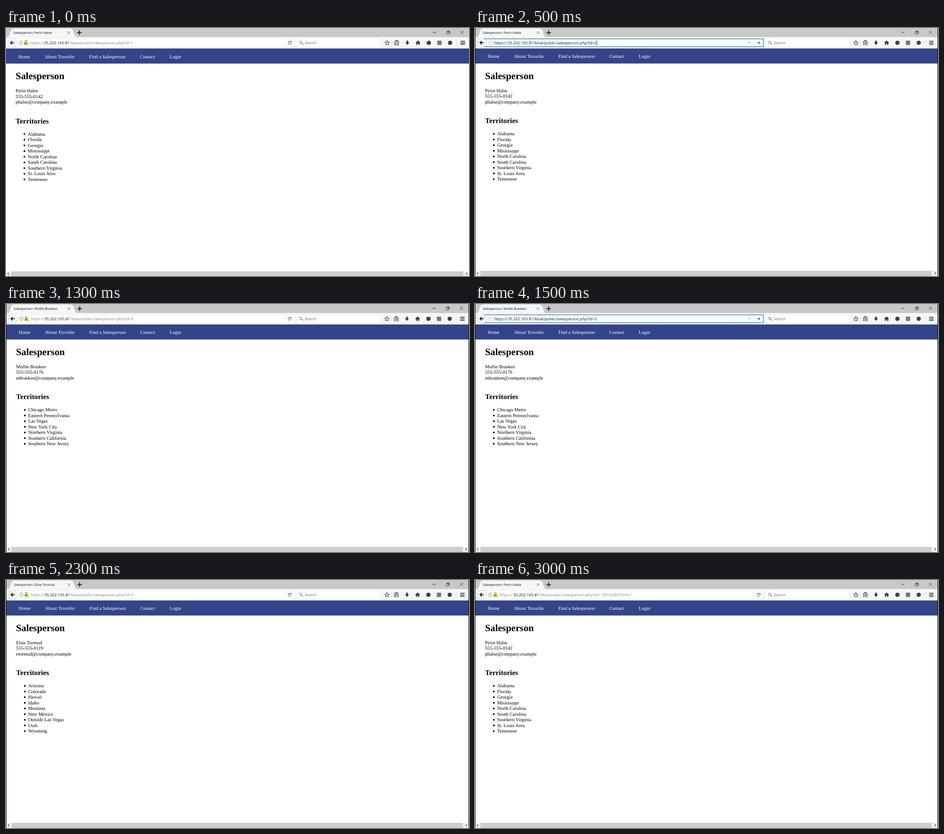
Recreate the animation shown at these times as an HTML page. Size 1023x548 px, loop 3.5 s.

```html
<!DOCTYPE html>
<html lang="en">
<head>
<meta charset="utf-8">
<title>Salesperson pages</title>
<style>
  html, body { margin: 0; width: 100%; height: 100%; overflow: hidden; background: #000; }
  svg { display: block; width: 1023px; height: 548px; text-rendering: geometricPrecision; }
  text { white-space: pre; }
  .ui { font-family: "Open Sans", "Noto Sans", sans-serif; }
  .page { font-family: "Liberation Serif", "Times New Roman", serif; font-size: 10.67px; }
  .line { fill: none; stroke: #333; }
</style>
</head>
<body>
<svg id="stage" viewBox="0 0 1023 548"></svg>
<script>
const SCENE_MS = 500;

const people = {
  perin: {
    name: "Perin Halse", phone: "555-555-0142", email: "phalse@company.example",
    areas: ["Alabama", "Florida", "Georgia", "Mississippi", "North Carolina",
            "South Carolina", "Southern Virginia", "St. Louis Area", "Tennessee"]
  },
  mollie: {
    name: "Mollie Brasken", phone: "555-555-0176", email: "mbrasken@company.example",
    areas: ["Chicago Metro", "Eastern Pennsylvania", "Las Vegas", "New York City",
            "Northern Virginia", "Southern California", "Southern New Jersey"]
  },
  elsie: {
    name: "Elsie Tormud", phone: "555-555-0119", email: "etormud@company.example",
    areas: ["Arizona", "Colorado", "Hawaii", "Idaho", "Montana",
            "New Mexico", "Outside Las Vegas", "Utah", "Wyoming"]
  }
};

const injection = "' OR SLEEP(5)=0--'";
const scenes = [
  { person: people.perin, id: "1", fullWidth: true },
  { person: people.perin, id: "2", editing: true, caret: true },
  { person: people.mollie, id: "2" },
  { person: people.mollie, id: "3", editing: true },
  { person: people.elsie, id: "3" },
  { person: people.elsie, id: injection, editing: true, forward: true },
  { person: people.perin, id: injection }
];

const rect = (x, y, w, h, fill, extra = "") =>
  `<rect x="${x}" y="${y}" width="${w}" height="${h}" fill="${fill}" ${extra}/>`;
const circle = (x, y, r, fill, extra = "") =>
  `<circle cx="${x}" cy="${y}" r="${r}" fill="${fill}" ${extra}/>`;
const line = (d, width = 1, color = "#333") =>
  `<path class="line" d="${d}" stroke-width="${width}" style="stroke:${color}"/>`;
const shape = (d, fill = "#3b3b3b") => `<path d="${d}" fill="${fill}"/>`;
const uiText = (x, y, size, fill, content, extra = "") =>
  `<text class="ui" x="${x}" y="${y}" font-size="${size}" fill="${fill}" ${extra}>${content}</text>`;
const pageText = (x, y, content, extra = "") =>
  `<text class="page" x="${x}" y="${y}" ${extra}>${content}</text>`;

function titleBar(name) {
  return rect(0, 0, 1023, 20, "#c8c8c8")
    + shape("M3 20C10 20 8 1 17 1H142C151 1 149 20 157 20Z", "#f5f6f7")
    + uiText(16, 13.3, 7.45, "#111", `Salesperson: ${name}`)
    + line("M135.5 7.3l6 6m0-6l-6 6", 0.9, "#555")
    + line("M157 10.3h10m-5-5v10", 1.7, "#111")
    + line("M943 9.5h7", 1, "#222")
    + line("M974 8h5v5h-5zM975.5 8V6.5h5v5H979", 0.9, "#222")
    + line("M1004 6l7 7m0-7l-7 7", 0.9, "#222");
}

function address({ id, editing, caret, forward }) {
  const x = forward ? 58 : editing ? 41 : 53.5;
  const dim = editing ? "#111" : "#808080";
  const infoX = forward ? 49.3 : 33;
  const infoColor = editing ? "#aaa" : "#666";
  const left = forward ? 41.5 : 20;
  let out = rect(left, 24, 617.5 - left + 20, 17.5, "#fff",
      editing ? 'stroke="#2d82c4" stroke-width="1.4"' : 'stroke="#ececec" stroke-width=".6"')
    + circle(infoX, 32.7, 4.2, "none", `stroke="${infoColor}" stroke-width=".8"`)
    + line(`M${infoX} 31.8v3.2m0-4.8v.9`, 1, infoColor)
    + `<text class="ui" y="36" font-size="8.7" fill="${dim}"><tspan x="${x}">https://</tspan>`
    + `<tspan x="${x + 30.5}" fill="#111">35.202.165.81</tspan>`
    + `<tspan x="${x + 87.5}">/blue/public/salesperson.php?id=${id}</tspan></text>`
    + line("M616 25v16", 0.7, "#e0e0e0");
  if (editing) {
    out += shape("M603 30.7h6.4l-3.2 4.4z", "#c0c0c0")
      + line("M623 32.7h7m-3-3l3 3l-3 3", 1.1, "#555");
  } else {
    out += line("M42 32v-2.2a2.1 2.1 0 0 1 4.2 0V32", 1.2, "#4ba52c")
      + rect(40.6, 31.5, 6.8, 5.5, "#4ba52c")
      + shape("M46.7 30.5l4 7h-8z", "#f5c400")
      + line("M629.8 30.7a3.4 3.4 0 1 0 .2 3", 1.1, "#555")
      + shape("M631 28.5v3.6h-3.6z", "#555");
  }
  if (caret) out += line("M269 27.5v10.5", 0.8, "#111");
  return out;
}

function toolbar(scene) {
  const star = Array.from({ length: 10 }, (_, i) => {
    const angle = i * Math.PI / 5 - Math.PI / 2, r = i % 2 ? 2.4 : 5.2;
    return `${842.3 + r * Math.cos(angle)} ${33 + r * Math.sin(angle)}`;
  }).join("L");
  return rect(0, 20, 1023, 25.5, "#f5f6f7")
    + address(scene)
    + circle(14, 32.6, 10, "#fbfbfb", 'stroke="#c4c4c4" stroke-width=".8"')
    + line("M18.7 32.6H10m4-4l-4 4l4 4", 1.9, "#222")
    + (scene.forward ? line("M28.5 32.6h8m-3.5-3.7l3.7 3.7l-3.7 3.7", 1.9, "#333") : "")
    + rect(643, 24, 185, 17.5, "#fff", 'stroke="#ececec" stroke-width=".6"')
    + circle(651.5, 31.5, 2.8, "none", 'stroke="#666"')
    + line("M653.5 33.7l3 3", 1.4, "#666")
    + uiText(660, 36, 8.8, "#707070", "Search", 'font-style="italic"')
    + line(`M${star}Z`, 1.1, "#444")
    + line("M853.5 27v11", 0.7, "#d0d0d0")
    + line("M859 29.3h8.5v8h-8.5zM861.5 29v-1.4h3.5V29M860.5 32h5.5m-5.5 2.5h5.5", 1.2, "#444")
    + shape("M885 28h3.6v4h2.8l-4.6 5.2l-4.6-5.2h2.8z")
    + shape("M910.3 27.5l5.5 5.2h-1.7v4.8h-2.6v-3h-2.4v3h-2.6v-4.8h-1.7z")
    + circle(934.2, 32.8, 4.8, "#3f3f3f")
    + rect(952.8, 28, 9.6, 9.6, "#777")
    + circle(981.3, 32.8, 4.8, "#444")
    + line("M996 27v11", 0.7, "#d0d0d0")
    + line("M1004.3 29.4h10m-10 3.4h10m-10 3.4h10", 1.7, "#333");
}

function webPage({ name, phone, email, areas }) {
  const nav = [["Home", 27], ["About Trovelin", 85.3], ["Find a Salesperson", 183.5],
               ["Contact", 296], ["Login", 361.5]];
  return rect(0, 45.3, 1023, 33.3, "#334488")
    + nav.map(([label, x]) => pageText(x, 66.6, label, 'fill="#fff"')).join("")
    + pageText(21.3, 112.8, "Salesperson", 'font-weight="bold" style="font-size:21.33px"')
    + [name, phone, email].map((row, i) => pageText(21.3, 142 + 12.5 * i, row)).join("")
    + pageText(21.3, 210.6, "Territories", 'font-weight="bold" style="font-size:16px"')
    + areas.map((area, i) => {
        const y = 237.6 + 12.53 * i;
        return circle(40.7, y - 3.2, 1.9, "#000") + pageText(48, y, area);
      }).join("");
}

function scrollBar() {
  return rect(0, 537.7, 1023, 13, "#f0f0f0")
    + rect(11.3, 537.7, 998.7, 13, "#cdcdcd")
    + line("M6.3 540.5l-2.5 2.5l2.5 2.5M1016.5 540.5l2.5 2.5l-2.5 2.5", 1.2, "#444");
}

function render(scene) {
  const fit = scene.fullWidth ? "" : 'transform="translate(1) scale(.998)"';
  return `<g ${fit}>${rect(0, 0, 1023, 551, "#fff")}${titleBar(scene.person.name)}`
    + `${toolbar(scene)}${webPage(scene.person)}${scrollBar()}</g>`;
}

const stage = document.getElementById("stage");
let shown = -1;
const start = performance.now();

function tick() {
  const index = Math.floor((performance.now() - start) / SCENE_MS) % scenes.length;
  if (index !== shown) {
    shown = index;
    stage.innerHTML = render(scenes[index]);
  }
  requestAnimationFrame(tick);
}
tick();
</script>
</body>
</html>
```
